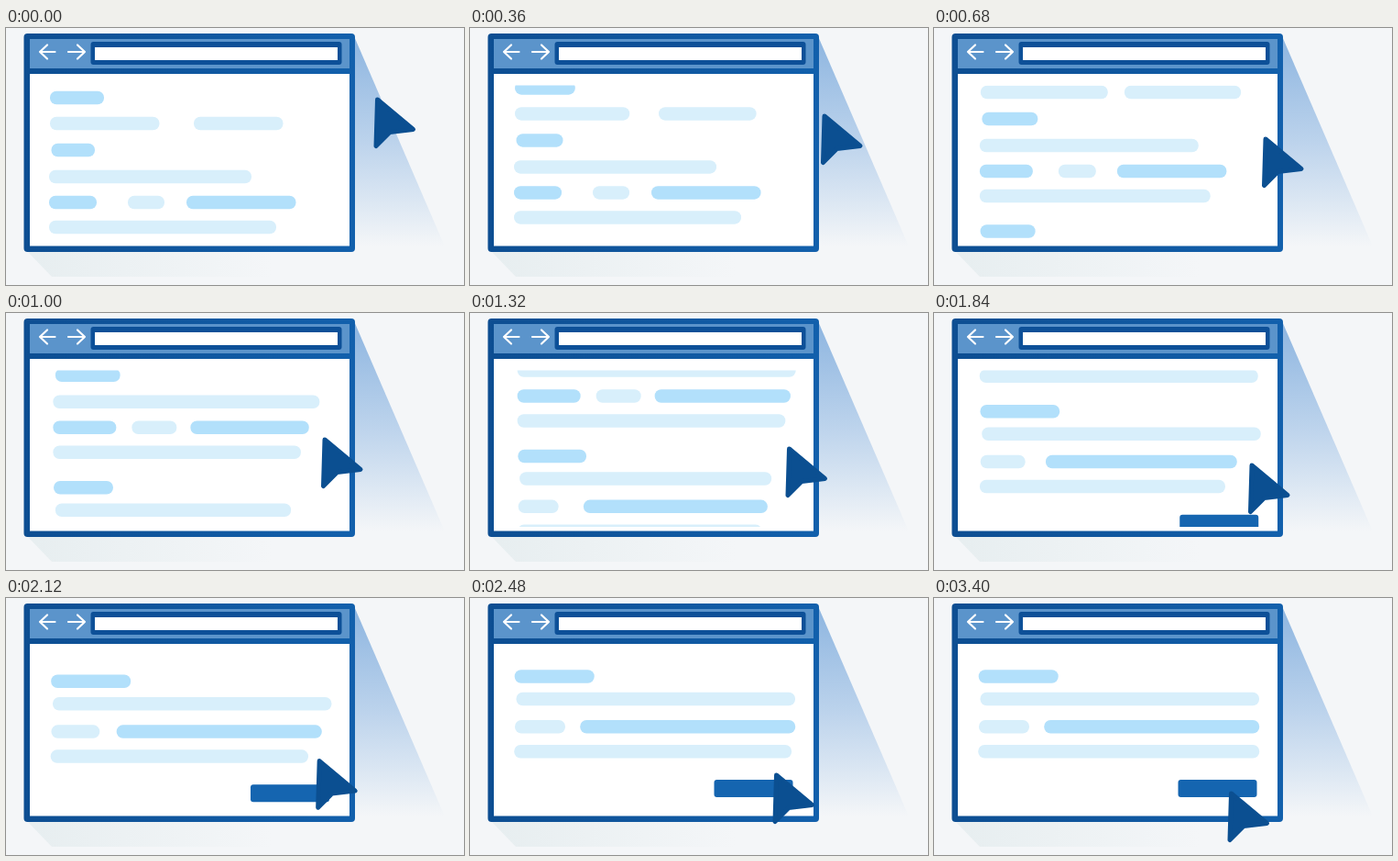
Animation, 500 px wide and 280 px high, one loop 3720 ms. Source, as an HTML page with a canvas:

```html
<!DOCTYPE html>
<html lang="en">
<head>
<meta charset="utf-8">
<title>Scrolling page</title>
<style>
  html, body { margin: 0; width: 100%; height: 100%; overflow: hidden; background: #f4f6f8; }
  canvas { display: block; width: 500px; height: 280px; }
</style>
</head>
<body>
<canvas id="stage" width="500" height="280"></canvas>
<script>
const ctx = document.getElementById('stage').getContext('2d');
const LOOP = 3720, STEP = 40;
const SCROLL = 170, SCROLL_TIME = 2370;
const DEEP = '#b2e0fb', PALE = '#d8effb';

// x, centre y, colour, start width, end width, growth start, growth end
const bars = [
  [48, 76, DEEP, 59, 72, 0, 700],
  [48, 104, PALE, 119.5, 145, 100, 950],
  [205, 104, PALE, 97.5, 134, 100, 900],
  [49.5, 133, DEEP, 47.5, 74, 100, 1250],
  [47, 162, PALE, 221, 304, 467, 1178],
  [47, 190, DEEP, 52, 69, 480, 980],
  [133, 190, PALE, 40, 49, 600, 1000],
  [197, 190, DEEP, 119.5, 149.5, 750, 1400],
  [47, 217, PALE, 248, 304, 495, 1655],
  [47.7, 255.5, DEEP, 60, 87, 660, 1910],
  [49.5, 280, PALE, 257, 304.5, 960, 1820],
  [48, 310.3, PALE, 44, 55, 1320, 2440],
  [119.2, 310.3, DEEP, 201, 235, 1560, 2460],
  [47.2, 337.3, PALE, 267, 307, 1753, 2660]
];

// time, x offset, y offset
const cursorPath = [
  [0, 0, 0], [680, -43.5, 43], [1000, -57.5, 60], [1320, -57, 70],
  [1840, -58.5, 88], [2480, -71, 115], [2800, -77, 127], [3240, -81, 135]
];

function ease(t, from, to) {
  const p = Math.min(1, Math.max(0, (t - from) / (to - from)));
  return p * p * (3 - 2 * p);
}

function slope(keys, i, axis) {
  if (i === 0 || i === keys.length - 1) return 0;
  const a = keys[i - 1], b = keys[i + 1];
  return (b[axis] - a[axis]) / (b[0] - a[0]);
}

function spline(keys, t, axis) {
  const last = keys.length - 1;
  if (t >= keys[last][0]) return keys[last][axis];
  let i = 0;
  while (t >= keys[i + 1][0]) i++;
  const a = keys[i], b = keys[i + 1], d = b[0] - a[0];
  const p = (t - a[0]) / d, q = 1 - p;
  return a[axis] * q * q * (1 + 2 * p) + b[axis] * p * p * (3 - 2 * p)
    + d * p * q * (q * slope(keys, i, axis) - p * slope(keys, i + 1, axis));
}

function box(x, y, w, h, r, fill) {
  ctx.fillStyle = fill;
  ctx.beginPath();
  ctx.roundRect(x, y, w, h, r);
  ctx.fill();
}

function polygon(points, fill) {
  ctx.fillStyle = fill;
  ctx.beginPath();
  points.forEach(([x, y]) => ctx.lineTo(x, y));
  ctx.closePath();
  ctx.fill();
}

function gradient(x0, y0, x1, y1, ...colours) {
  const g = ctx.createLinearGradient(x0, y0, x1, y1);
  colours.forEach((c, i) => g.addColorStop(i / (colours.length - 1), c));
  return g;
}

function arrow(tail, tip) {
  const back = tip + Math.sign(tail - tip) * 8;
  ctx.strokeStyle = '#fff';
  ctx.lineWidth = 2.2;
  ctx.lineCap = ctx.lineJoin = 'round';
  ctx.beginPath();
  ctx.moveTo(tail, 26);
  ctx.lineTo(tip, 26);
  ctx.moveTo(back, 18.5);
  ctx.lineTo(tip, 26);
  ctx.lineTo(back, 33.5);
  ctx.stroke();
}

function drawShadows() {
  polygon([[380, 9], [479, 238], [380, 238]],
    gradient(0, 10, 0, 238, '#8db5e0', '#bcd3ec', '#f4f6f8'));
  polygon([[23, 243], [50, 271], [300, 271], [300, 243]],
    gradient(30, 0, 290, 0, '#e7eef0', '#f4f6f8'));
}

function drawWindow() {
  box(19.5, 6, 361.5, 238, 4, gradient(20, 0, 381, 0, '#0d4e92', '#1260ac'));
  ctx.fillStyle = '#5b94cb';
  ctx.fillRect(26, 12, 349, 32);
  ctx.fillStyle = '#fff';
  ctx.fillRect(26, 50, 349, 187.5);
  box(92.5, 15, 274, 25, 3, '#0d5098');
  ctx.fillStyle = '#fff';
  ctx.fillRect(97, 21, 265, 14);
  arrow(53.5, 37);
  arrow(68, 86);
}

function drawPage(t) {
  const u = ease(t, 0, SCROLL_TIME);
  ctx.save();
  ctx.beginPath();
  ctx.rect(26, 62.5, 349, 170.5);
  ctx.clip();
  ctx.translate(16.8 * u * (1 - u) + u, -SCROLL * u);
  for (const [x, y, colour, w0, w1, from, to] of bars) {
    box(x, y - 7.25, w0 + (w1 - w0) * ease(t, from, to), 14.5, 7, colour);
  }
  box(265.5, 368, 86, 19, 3, '#1565b0');
  ctx.restore();
}

function drawCursor(t) {
  ctx.save();
  ctx.translate(spline(cursorPath, t, 1), spline(cursorPath, t, 2));
  polygon([[405.5, 78], [444.5, 110.5], [419, 113.5], [404, 128.5]], '#0b4f91');
  ctx.strokeStyle = '#0b4f91';
  ctx.lineWidth = 5;
  ctx.lineJoin = 'round';
  ctx.stroke();
  ctx.restore();
}

function draw(now) {
  const t = Math.floor((now % LOOP) / STEP) * STEP;
  ctx.fillStyle = '#f4f6f8';
  ctx.fillRect(0, 0, 500, 280);
  drawShadows();
  drawWindow();
  drawPage(t);
  drawCursor(t);
}

const start = performance.now();
function tick() {
  draw(performance.now() - start);
  requestAnimationFrame(tick);
}
tick();
</script>
</body>
</html>
```
